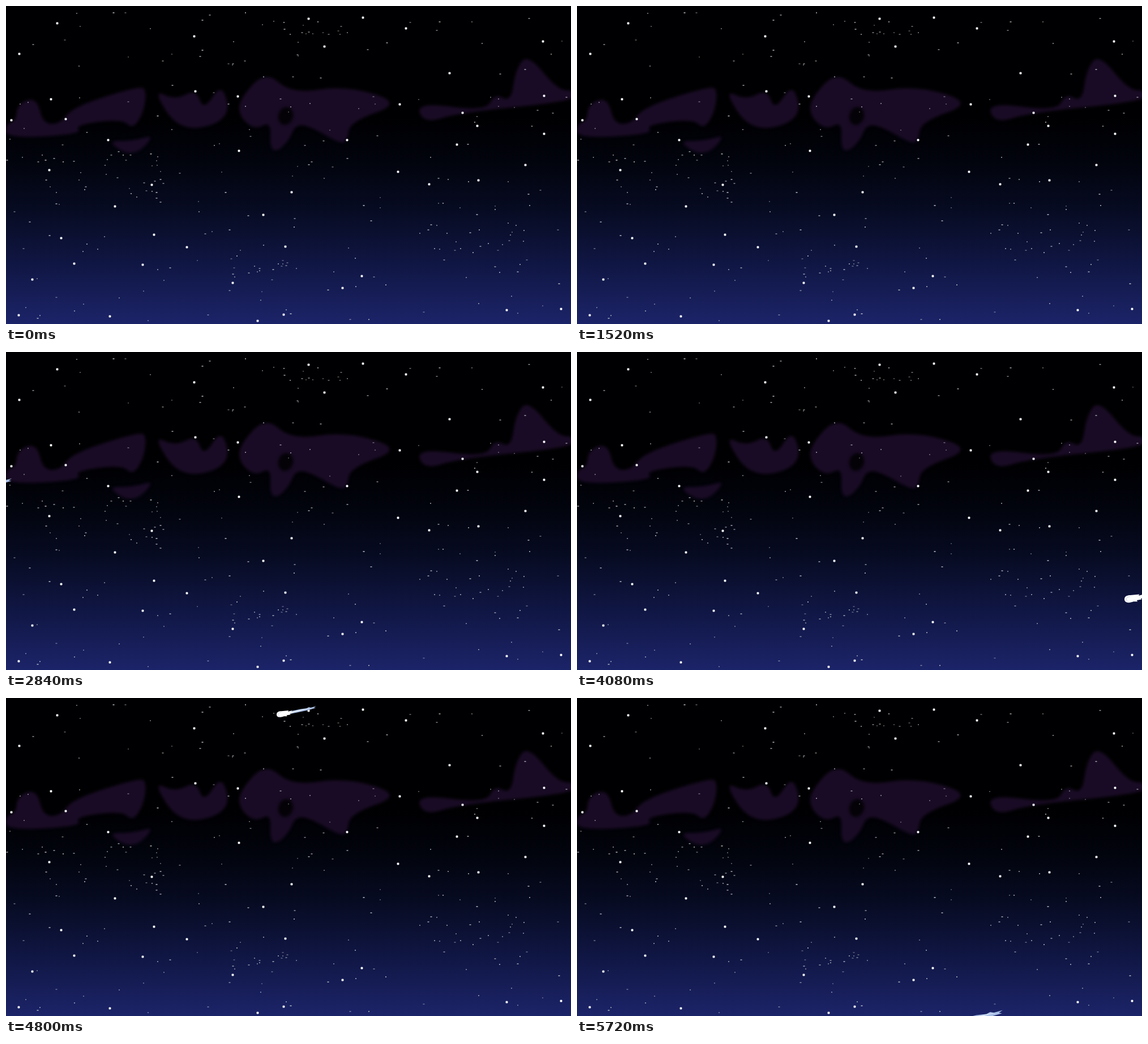
An HTML page with a canvas for the animation above (5.76 s loop, 998 by 561 pixels).

```html
<!DOCTYPE html>
<html lang="en">
<head>
<meta charset="utf-8">
<title>Shooting stars</title>
<style>
html, body { margin: 0; width: 100%; height: 100%; overflow: hidden; background: #000; }
canvas { display: block; width: 998px; height: 561px; }
</style>
</head>
<body>
<canvas id="stage" width="998" height="561"></canvas>
<script>
const W = 998, H = 561, LOOP = 5760, STEP = 40;
const ctx = document.getElementById('stage').getContext('2d');

const bright = [
  90,30, 332,53, 534,22, 630,20, 706,39, 562,71, 948,62, 23,84, 783,118, 79,164,
  105,199, 9,201, 409,159, 334,150, 695,173, 806,188, 950,158, 832,211, 950,225,
  796,244, 602,236, 180,236, 411,255, 76,289, 257,315, 192,353, 504,328,
  454,368, 692,292, 747,314, 834,307, 917,280, 97,409, 261,403, 319,425,
  493,424, 120,454, 241,456, 46,482, 400,488, 628,476, 594,497, 22,545, 183,547,
  444,555, 490,544, 884,536, 980,534
];
// x, y, width, height, number of stars
const fields = [
  [0, 10, W, 240, 84], [0, 255, W, 300, 112], [480, 25, 125, 25, 13],
  [125, 260, 145, 70, 16], [395, 435, 105, 50, 16], [740, 330, 190, 150, 32]
];

const clouds = [
  [0,208, 18,202, 19,178, 38,164, 56,168, 66,208, 96,208, 118,178, 235,141, 248,148,
   244,186, 224,218, 205,199, 120,210, 136,226, 0,234],
  [258,147, 300,166, 336,146, 349,186, 382,133, 398,201, 308,224],
  [412,195, 412,165, 458,114, 505,155, 600,140, 702,171, 608,204, 603,236, 592,244,
   535,211, 511,210, 501,235, 480,257, 466,251, 468,203, 440,219],
  [176,238, 225,238, 265,226, 225,268],
  [724,169, 848,186, 863,154, 892,170, 900,112, 922,84, 974,148, 1004,149, 1004,168,
   800,188, 738,208]
];

// (x, y): head position at time `at`; visible from `from` to `to`
const comets = [
  { from: 680,  to: 1520, at: 1000, x: 546, y: 291.5, size: 1 },
  { from: 2120, to: 2880, at: 2400, x: 435, y: 117,   size: .915, grow: true },
  { from: 4080, to: 4760, at: 4080, x: 967, y: 435.5, size: .8 },
  { from: 4640, to: 5480, at: 4800, x: 478, y: 28.5,  size: .645 },
  { from: 5440, to: 5760, at: 5720, x: 633, y: 575,   size: 1.1 }
];
const VX = -1.3, VY = .313;

function random(seed) {
  return () => (seed = (seed * 16807) % 2147483647) / 2147483647;
}

// Smooth closed outline through the middles of the edges
function outline(c, p) {
  const n = p.length;
  c.beginPath();
  c.moveTo((p[n - 2] + p[0]) / 2, (p[n - 1] + p[1]) / 2);
  for (let i = 0; i < n; i += 2) {
    const j = (i + 2) % n;
    c.quadraticCurveTo(p[i], p[i + 1], (p[i] + p[j]) / 2, (p[i + 1] + p[j + 1]) / 2);
  }
  c.closePath();
}

function box(c, x, y, w, h, color) {
  c.fillStyle = color;
  c.fillRect(x - w / 2, y - h / 2, w, h);
}

function drawClouds(c) {
  c.filter = 'blur(2.5px)';
  c.fillStyle = '#190b25';
  for (const p of clouds) { outline(c, p); c.fill(); }
  c.fillStyle = '#040207';
  c.beginPath();
  c.ellipse(494, 194, 13, 16, .3, 0, 7);
  c.fill();
  c.filter = 'none';
}

function drawStars(c) {
  const rnd = random(4127);
  for (const [x, y, w, h, n] of fields) {
    for (let i = 0; i < n; i++) {
      const px = Math.round(x + rnd() * w), py = Math.round(y + rnd() * h);
      const a = .3 + rnd() * .4, wide = rnd() < .4 ? 3 : 2;
      box(c, px, py, wide, 2, `rgba(205,210,215,${a})`);
    }
  }
  for (let i = 0; i < bright.length; i += 2) {
    const x = bright[i] + .5, y = bright[i + 1] + .5, glow = 'rgba(200,205,215,.5)';
    box(c, x, y, 5, 3, glow);
    box(c, x, y, 3, 5, glow);
    box(c, x, y, 3, 3, '#fff');
  }
}

function makeSky() {
  const sky = document.createElement('canvas');
  sky.width = W;
  sky.height = H;
  const c = sky.getContext('2d');
  const g = c.createLinearGradient(0, 0, 0, H);
  const stops = { .35: '#000002', .5: '#02040e', .64: '#070b22',
                  .78: '#0e143d', 1: '#1c2469' };
  for (const at in stops) g.addColorStop(+at, stops[at]);
  c.fillStyle = g;
  c.fillRect(0, 0, W, H);
  drawClouds(c);
  drawStars(c);
  return sky;
}

function shape(path, color) {
  ctx.fillStyle = color;
  ctx.fill(new Path2D(path));
}

function drawComet(m, t) {
  const dt = t - m.at;
  const grow = m.grow ? Math.min(1, .45 + .4 * (t - m.from) / STEP) : 1;
  ctx.save();
  ctx.translate(m.x + VX * m.size * dt, m.y + VY * m.size * dt);
  ctx.scale(m.size * grow, m.size * grow);
  // pale blue tail with its lighter core
  shape('M28-6 L66-14 L82-16 L88-19 L94-18 L108-22 L102-18 L107-17 L86-11 L34 0Z', '#a9bfe6');
  shape('M28-4 L56-10 L100-19 L64-9 L40-3Z', '#e2ebfb');
  // head with ragged flames
  shape('M0 1 C0-5 5-8 13-8 L33-10 L31-7 L43-10 L38-5 L47-5 L35-1 L39 1 L27 3 L29 6 L20 6 C10 10 0 9 0 1Z', '#fff');
  ctx.strokeStyle = '#b7c5dc';
  ctx.stroke(new Path2D('M13-5 C3-5 0 5 10 6'));
  ctx.restore();
}

const sky = makeSky();

function draw(now) {
  const t = Math.floor((now % LOOP) / STEP) * STEP;
  ctx.drawImage(sky, 0, 0);
  for (const m of comets) if (t >= m.from && t < m.to) drawComet(m, t);
}

let start;
function tick(now) {
  start ??= now;
  draw(now - start);
  requestAnimationFrame(tick);
}
draw(0);
requestAnimationFrame(tick);
</script>
</body>
</html>
```
